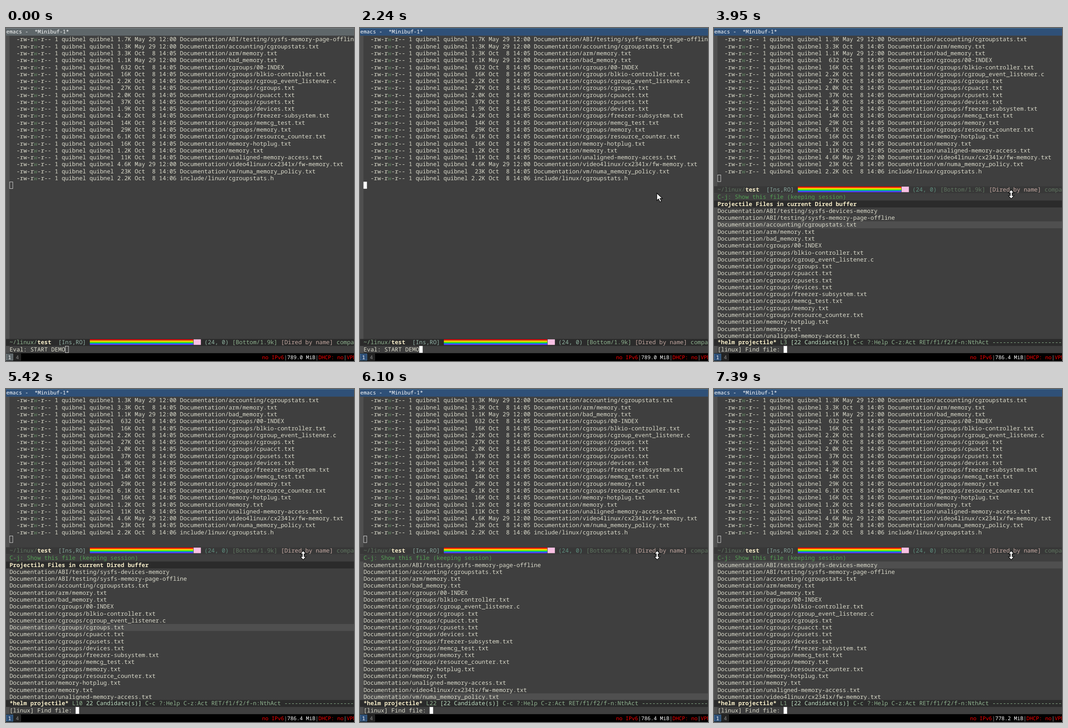
Recreate the animation shown at these times as an HTML page. Size 764 by 733 pixels, loop 8 s.

```html
<!DOCTYPE html>
<html lang="en">
<head>
<meta charset="utf-8">
<title>Helm demo</title>
<style>
  html, body { margin: 0; width: 100%; height: 100%; overflow: hidden; background: #000; }
  svg { display: block; width: 764px; height: 733px; }
  text {
    font: 16.6667px "Noto Sans Mono", "DejaVu Sans Mono", monospace;
    white-space: pre; text-rendering: geometricPrecision; fill: #dcdccc;
  }
  text.bar { font-size: 15px; fill: #fff; }
  text.red { fill: #f00; }
  text.sep { fill: #aaa; }
  text.off { fill: #888; }
  .group-w { fill: #5f7f5f; }
  .bold { font-weight: bold; fill: #f5ecc8; }
  .hint { fill: #53a053; }
  .path, .info { fill: #8fb28f; }
  .state { fill: #93b3a8; }
  .pos { fill: #8fb2a0; }
  .mode { fill: #c4a9a2; }
  .count { fill: #bfe0c4; }
  .modeline { fill: #2b2b2b; }
  .dim .modeline { fill: #383838; }
  .dim .path, .dim .info { fill: #5f7560; }
  .dim .pos { fill: #5f8f7f; }
  .dim .state { fill: #86a59c; }
  .cursor { fill: #fff; stroke: #fff; }
  .cursor.hollow { fill: none; }
  .pointer { fill: #fff; stroke: #000; stroke-width: 1.5; }
  .frame { fill: #5f676a; }
  .focus .frame { fill: #2f5078; }
  .edge { fill: #80888b; }
  .focus .edge { fill: #4c7899; }
</style>
</head>
<body>
<svg id="stage" viewBox="0 0 1000 959.424" xmlns="http://www.w3.org/2000/svg"></svg>
<script>
const LOOP = 8000, CELL = 10, ROW = 20, BASE = 15.5, VISIBLE = 20;
const USER = "quibnel";
const LISTING = `1.7K M ABI/testing/sysfs-memory-page-offline
1.3K M accounting/cgroupstats.txt
3.3K O arm/memory.txt
1.1K M bad_memory.txt
632 O cgroups/00-INDEX
16K O cgroups/blkio-controller.txt
2.2K O cgroups/cgroup_event_listener.c
27K O cgroups/cgroups.txt
2.0K O cgroups/cpuacct.txt
37K O cgroups/cpusets.txt
1.9K O cgroups/devices.txt
4.2K O cgroups/freezer-subsystem.txt
14K O cgroups/memcg_test.txt
29K O cgroups/memory.txt
6.1K O cgroups/resource_counter.txt
16K O memory-hotplug.txt
1.2K O memory.txt
11K O unaligned-memory-access.txt
4.6K M video4linux/cx2341x/fw-memory.txt
23K O vm/numa_memory_policy.txt
2.2K L include/linux/cgroupstats.h`;
const DATES = { M: "May 29 12:00", O: "Oct  8 14:05", L: "Oct  8 14:06" };

const files = LISTING.split("\n").map(row => {
  const [size, day, path] = row.split(" ");
  return { size, date: DATES[day], path: (day === "L" ? "" : "Documentation/") + path };
});
const candidates = ["Documentation/ABI/testing/sysfs-devices-memory", ...files.map(f => f.path)];

// ---- drawing helpers (grid units: 10 x 20 cells) ----
function el(parent, tag, attrs = {}) {
  const node = document.createElementNS("http://www.w3.org/2000/svg", tag);
  for (const k in attrs) node.setAttribute(k, attrs[k]);
  parent.appendChild(node);
  return node;
}
const group = parent => el(parent, "g");
const rect = (parent, x, y, width, height, attrs) => el(parent, "rect", { x, y, width, height, ...attrs });
function label(parent, x, y, str, cls = "") {
  const node = el(parent, "text", { x, y, class: cls });
  node.textContent = str;
  return node;
}
const cells = (parent, col, top, str, cls) => label(parent, CELL * (col + 1), top + BASE, str, cls);
const show = (node, on) => node.setAttribute("display", on ? "inline" : "none");
const shift = (node, y) => node.setAttribute("transform", `translate(0 ${y})`);
const cursor = (parent, col, top) =>
  rect(parent, CELL * (col + 1) + .5, top + .5, 9, 19, { class: "cursor" });
const setHollow = (node, on) => node.classList.toggle("hollow", on);

// ---- editor ----
const stage = document.getElementById("stage");
rect(stage, 0, 0, 1000, 937, { fill: "#3f3f3f" });
rect(stage, 0, 22, 10, 915, { fill: "#4f4f4f" });

const dired = group(stage);
const diredRows = files.map((f, i) => {
  const g = group(dired), top = 23 + ROW * i;
  cells(g, 2, top, "-rw-r");
  cells(g, 7, top, "w", "group-w");
  cells(g, 8, top, `-r-- 1 ${USER} ${USER} ${f.size.padStart(4)} ${f.date} ${f.path}`);
  return g;
});
const diredCursor = cursor(dired, 0, 23 + ROW * files.length);

// ---- helm list ----
const helm = group(stage);
rect(helm, 0, 477, 1000, 20, { fill: "#3f3f3f" });
cells(helm, 0, 477, "C-j: Show this file (keeping session)", "hint");
const highlight = rect(helm, 10, 0, 990, 20, { fill: "#4f4f4f" });
const header = group(helm);
rect(header, 0, 497, 1000, 20, { fill: "#2b2b2b" });
cells(header, 0, 497, "Projectile Files in current Dired buffer", "bold");
const list = group(helm);
const listRows = candidates.map((path, i) => cells(list, 0, 517 + ROW * i, path));
rect(helm, 0, 896, 1000, 20, { class: "modeline" });
cells(helm, 0, 896, "*helm projectile*", "bold");
const lineNo = cells(helm, 18, 896, "", "info");
const helmInfo = group(helm);
const bracket = cells(helmInfo, 21, 896, "[", "count");
cells(helmInfo, 22, 896, "22 Candidate(s)]", "count");
cells(helmInfo, 39, 896, "C-c ?:Help C-z:Act RET/f1/f2/f-n:NthAct " + "-".repeat(24), "info");

// ---- dired mode line ----
const status = group(stage);
rect(status, 0, 896, 1000, 20, { class: "modeline" });
[[0, "~/linux/", "path"], [8, "test", "bold"], [14, "[Ins,RO]", "state"], [56, "(24, 0)", "pos"],
 [64, "[Bottom/1.9k]", "info"], [78, "[Dired by name]", "mode"], [94, "company", "info"]]
  .forEach(([col, str, cls]) => cells(status, col, 896, str, cls));
["#f00", "#f90", "#ff0", "#3f0", "#09f", "#63f"].forEach((fill, i) =>
  rect(status, 241, 897 + i * 2.7, 297, 2.7, { fill }));
rect(status, 539, 897, 21, 16, { fill: "#f9c0e4" });

// ---- minibuffer, title and bottom bar ----
const echo = cells(stage, 0, 916, "");
const miniCursor = cursor(stage, 0, 916);

const chrome = group(stage);
rect(chrome, 0, 0, 1000, 22, { class: "frame" });
rect(chrome, 0, 0, 1000, 1.3, { class: "edge" });
const title = label(chrome, 1, 16, "", "bar");
rect(chrome, 0, 937, 1000, 23, { fill: "#000" });
rect(chrome, 0, 938, 21, 20, { class: "edge" });
rect(chrome, 1, 939, 19, 18, { class: "frame" });
label(chrome, 6, 954, "1", "bar");
rect(chrome, 22.5, 938.5, 20, 19, { fill: "#222", stroke: "#333" });
label(chrome, 28, 954, "4", "bar off");
[[0, "no IPv6", "red"], [7, "|", "sep"], [17, "|", "sep"], [18, "DHCP: no", "red"],
 [26, "|", "sep"], [27, "VPN: no", "red"]]
  .forEach(([col, str, cls]) => label(chrome, 736 + 9 * col, 954, str, "bar " + cls));
const memory = label(chrome, 808, 954, "", "bar");

const arrow = el(stage, "path", {
  class: "pointer", d: "M853 476v21l5-4.500 4 8.500 4-2-4-8h7z"
});
const resize = el(stage, "path", {
  class: "pointer", d: "M854 466l8 9h-5.500v8h5.500l-8 9-8-9h5.500v-8h-5.500z"
});

// ---- timeline ----
const moves = [[3290, 1], [3790, 2], [3950, 3], [4090, 4], [4230, 5], [4390, 6], [4510, 7], [4630, 8], [4790, 9]];
for (let n = 11; n <= 21; n++) moves.push([5460 + 40 * (n - 11), n]);
moves.push([6140, 22], [6310, 1], [6470, 2], [7020, 3], [7200, 2], [7390, 1]);

// Scroll just enough to keep the selection in view.
let first = 0;
const views = moves.map(([at, sel]) => {
  first = Math.min(sel, Math.max(first, sel - VISIBLE + 1));
  return { at, sel, first };
});
// Moments when the line number is redrawn ahead of the list.
const early = [[3750, 2], [5420, 10], [6100, 22], [6270, 1]];

function drawHelm(t) {
  const { sel, first } = views.filter(v => v.at <= t).pop();
  const lead = early.find(([at]) => t >= at && t < at + 40);
  const line = lead ? lead[1] : sel;
  const partial = line > 9 && sel < 10;
  highlight.setAttribute("y", 497 + ROW * (sel - first));
  show(header, first === 0);
  shift(list, -ROW * first);
  listRows.forEach((row, i) => show(row, i + 1 >= first && i + 1 < first + VISIBLE));
  lineNo.textContent = "L" + line;
  show(bracket, !partial);
  helmInfo.setAttribute("transform", `translate(${line > 9 && !partial ? CELL : 0} 0)`);
}

function prompt(t) {
  if (t < 2290) return "Eval: START DEMO";
  if (t < 2850) return "";
  return t < 3290 ? "C-c-" : "[linux] Find file: ";
}

function draw(t) {
  const split = t >= 3290, idle = t >= 2290 && !split;
  chrome.classList.toggle("focus", t >= 410);
  title.textContent = "emacs -  " + (idle ? "test" : "*Minibuf-1*");
  memory.textContent = (t < 2430 ? "789.0" : t < 7300 ? "786.4" : "778.2") + " MiB";

  shift(dired, split ? -ROW : 0);
  show(diredRows[0], !split);
  setHollow(diredCursor, t < 2240 || split);
  shift(status, split ? -440 : 0);
  status.classList.toggle("dim", split);

  const text = prompt(t);
  echo.textContent = text;
  miniCursor.setAttribute("x", CELL * (text.length + 1) + .5);
  setHollow(miniCursor, t < 470);
  show(miniCursor, !idle);

  show(helm, split);
  if (split) drawHelm(t);
  show(arrow, t >= 520 && t < 3340);
  show(resize, t >= 3340);
}

function tick() {
  draw(performance.now() % LOOP);
  requestAnimationFrame(tick);
}
tick();
</script>
</body>
</html>
```
